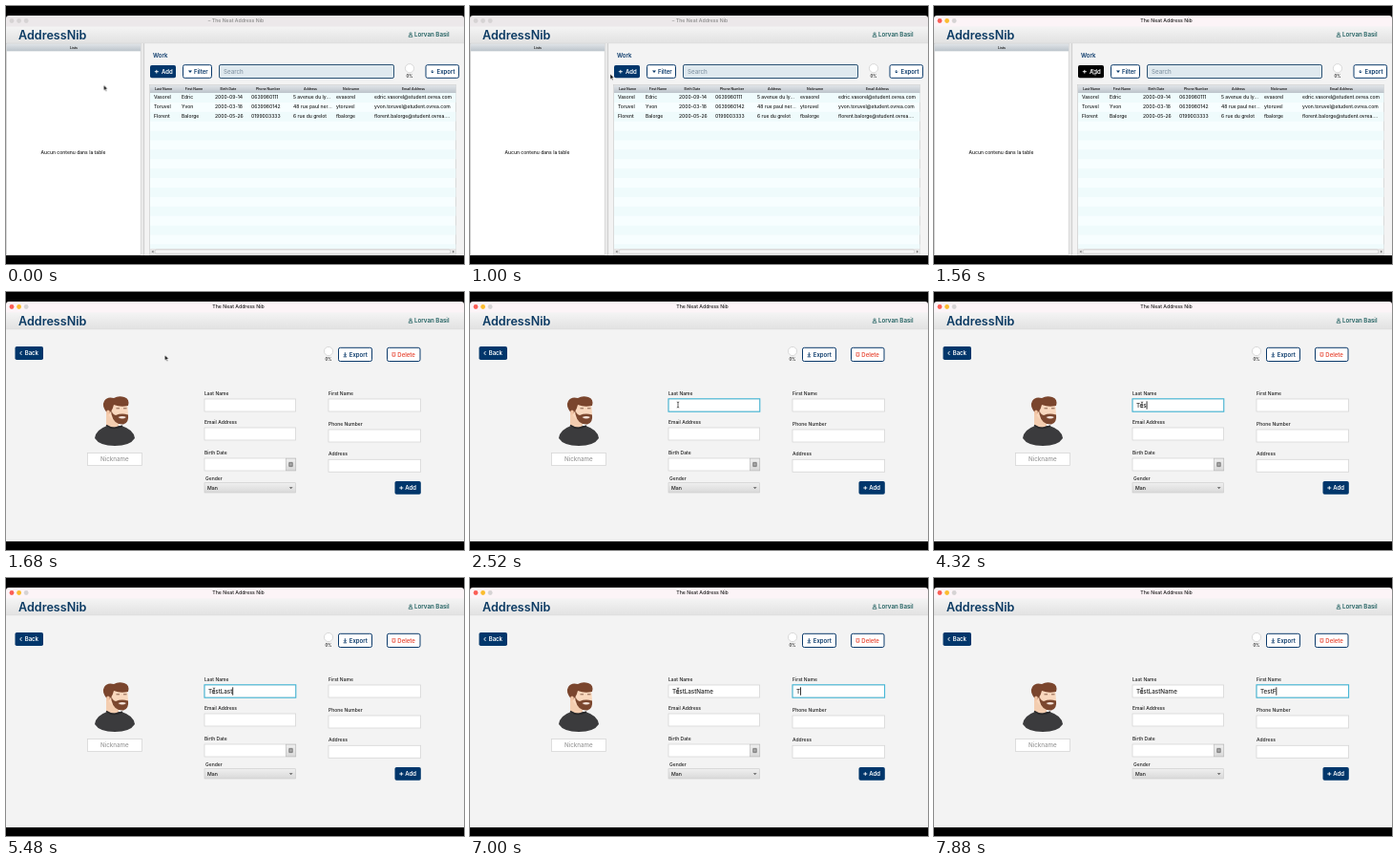
An HTML page that plays this animation: 480 px wide and 270 px high, repeating every 8000 ms.

```html
<!DOCTYPE html>
<html lang="en">
<head>
<meta charset="utf-8">
<title>Address book</title>
<style>
  html, body { margin: 0; width: 100%; height: 100%; overflow: hidden; background: #000; }
  svg { display: block; width: 480px; height: 270px; }
  text { font-family: Inter, "Open Sans", sans-serif; font-weight: 500; font-size: 5px; fill: #1c1c1c; white-space: pre; }

  .mid { text-anchor: middle; }
  .brand { font-size: 12.6px; font-weight: 600; fill: #0b3a63; }
  .user { font-size: 6.2px; font-weight: 600; fill: #1f5f5f; }
  .title { font-size: 5.2px; text-anchor: middle; }
  .head { font-size: 3.5px; font-weight: 600; text-anchor: middle; }
  .percent { font-size: 4.2px; text-anchor: middle; }
  .ring { fill: #fff; stroke: #ccc; stroke-width: .7; }
  .lights { fill: #d6d3d4; }
  .btn rect { fill: #fff; stroke: #0b3a6b; }
  .btn text { font-size: 6px; font-weight: 600; fill: #0b3a6b; }
  .btn path, .btn use { fill: none; stroke: #0b3a6b; stroke-width: .9; }
  .dark rect { fill: #00366b; stroke: none; }
  .dark text { fill: #fff; }
  .dark path, .dark use { stroke: #fff; }
  .red text { fill: #e8513f; }
  .red path { stroke: #e8513f; }
  .field { fill: #fff; stroke: #d6d6d6; stroke-width: .8; }
  .focus { fill: none; stroke: #38b4d6; }
  .typed { font-size: 6.25px; fill: #222; }
  .hint { font-size: 6.2px; fill: #9a9a9a; }

  /* Hard state changes */
  .idle, .active, .list, .form, .press rect, .arrow, .beam, .f-last, .f-first {
    animation: 8s step-end infinite;
  }
  .idle { animation-name: idle; }
  .active { animation-name: active; }
  .list { animation-name: list; }
  .form { animation-name: form; }
  .press rect { animation-name: press; }
  .arrow { animation-name: arrow; }
  .beam { animation-name: beam; }
  .f-last { animation-name: last; }
  .f-first { animation-name: first; }
  @keyframes idle { 18%, 100% { visibility: hidden; } }
  @keyframes active { 0% { visibility: hidden; } 18%, 100% { visibility: visible; } }
  @keyframes list { 20%, 100% { visibility: hidden; } }
  @keyframes form { 0% { visibility: hidden; } 20%, 100% { visibility: visible; } }
  @keyframes press { 18%, 100% { fill: #000; } }
  @keyframes arrow { 30.5%, 100% { visibility: hidden; } }
  @keyframes beam { 0% { visibility: hidden; } 30.5%, 100% { visibility: visible; } }
  @keyframes last { 0% { visibility: hidden; } 31% { visibility: visible; } 78%, 100% { visibility: hidden; } }
  @keyframes first { 0% { visibility: hidden; } 78%, 100% { visibility: visible; } }

  .mouse { animation: move 8s ease-in-out infinite; }
  @keyframes move {
    0%, 6.5% { transform: translate(102.5px, 82.7px); }
    16.25%, 23.5% { transform: translate(166.5px, 66px); }
    31%, 100% { transform: translate(218px, 118px); }
  }
</style>
</head>
<body>
<svg viewBox="0 0 480 270">
  <defs>
    <linearGradient id="top" x2="0" y2="1">
      <stop offset="0" stop-color="#f4f4f4"/><stop offset="1" stop-color="#e2e2e2"/>
    </linearGradient>
    <linearGradient id="th" x2="0" y2="1">
      <stop offset="0" stop-color="#e0e4e8"/><stop offset="1" stop-color="#bcc4cb"/>
    </linearGradient>
    <linearGradient id="combo" x2="0" y2="1">
      <stop offset="0" stop-color="#efefef"/><stop offset="1" stop-color="#d9d9d9"/>
    </linearGradient>
    <path id="down" d="M0-2V1M-1.3-.3L0 1L1.3-.3"/>
    <path id="save" d="M0-2.4V1M-1.3-.3L0 1L1.3-.3M-1.7 2.2H1.7"/>
    <path id="plus" d="M-2 0H2M0-1.8V1.8"/>
    <path id="bar" d="M0 21.5V13Q0 10 3 10H477Q480 10 480 13V21.5Z"/>
  </defs>

  <rect width="480" height="270"/>
  <rect y="21" width="480" height="240" fill="#f3f3f3"/>
  <rect y="21.5" width="480" height="17" fill="url(#top)"/>
  <path d="M0 38.7H480" stroke="#d2d2d2" stroke-width=".6"/>

  <g class="idle">
    <use href="#bar" fill="#ece8ea"/>
    <g class="lights"><circle cx="6" cy="15.5" r="2.4"/><circle cx="13.6" cy="15.5" r="2.4"/><circle cx="21.2" cy="15.5" r="2.4"/></g>
    <text class="title" x="241" y="17.3" style="fill:#888">– The Neat Address Nib</text>
  </g>
  <g class="active">
    <use href="#bar" fill="#fcf4f7"/>
    <g class="lights"><circle cx="6" cy="15.5" r="2.4" fill="#fb5e56"/><circle cx="13.6" cy="15.5" r="2.4" fill="#fbbc2e"/><circle cx="21.2" cy="15.5" r="2.4"/></g>
    <text class="title" x="243.5" y="17.3">The Neat Address Nib</text>
  </g>
  <text class="brand" x="13" y="35">AddressNib</text>
  <path d="M422 32.3Q422 30 424 30T426 32.3ZM422.9 28.9a1.1 1.1 0 1 1 2.2 0a1.1 1.1 0 1 1-2.2 0" fill="none" stroke="#1f5f5f" stroke-width=".7"/>
  <text class="user" x="428" y="32.4">Lorvan Basil</text>

  <g class="list">
    <rect x=".4" y="39.4" width="140.8" height="221.2" fill="#fff" stroke="#c8c8c8" stroke-width=".7"/>
    <rect x=".5" y="39.5" width="140.6" height="7.8" fill="url(#th)"/>
    <text class="head" x="71" y="44.6">Lists</text>
    <text class="mid" x="70.5" y="155.3">Aucun contenu dans la table</text>
    <rect x="142" y="39" width="3" height="222" fill="#e9e9e9"/>
    <path d="M144.6 39V261" stroke="#c2c2c2" stroke-width=".7"/>
    <text x="154" y="54" style="font-size:6px;font-weight:600;fill:#0b3a6b">Work</text>

    <g class="btn dark press">
      <rect x="151" y="62" width="27" height="13.3" rx="1.8"/>
      <use href="#plus" x="157.8" y="68.7"/><text x="163" y="70.8">Add</text>
    </g>
    <g class="btn">
      <rect x="185.5" y="61.7" width="30" height="13.6" rx="1.8"/>
      <path d="M191 67.6H195L193 70Z" style="fill:#0b3a6b;stroke:none"/><text x="197" y="70.8">Filter</text>
    </g>
    <rect x="223.5" y="61.5" width="183" height="14" rx="1.6" fill="#dfe9ef" stroke="#2b5274"/>
    <text x="228" y="70.8" style="font-size:6.2px;fill:#8496a5">Search</text>
    <circle class="ring" cx="423" cy="65.2" r="4.6"/>
    <text class="percent" x="423" y="75">0%</text>
    <g class="btn">
      <rect x="440" y="61.7" width="34.6" height="13.6" rx="1.8"/>
      <use href="#down" x="446.8" y="69"/><text x="451.5" y="70.8">Export</text>
    </g>

    <rect x="150.5" y="82.5" width="321" height="178" fill="#f7feff" stroke="#cecece" stroke-width=".7"/>
    <rect x="151" y="83" width="320.4" height="8" fill="url(#th)"/>
    <g id="table"></g>
    <rect x="151" y="254" width="320.4" height="6.2" fill="#e6e6e6"/>
    <rect x="156" y="255" width="310" height="4.2" rx="2" fill="#f4f4f4" stroke="#c0c0c0" stroke-width=".6"/>
    <path d="M154.5 255.7V258.5L152.5 257.1ZM468 255.7V258.5L470 257.1Z" fill="#777"/>
  </g>

  <g class="form">
    <g class="btn dark">
      <rect x="9.5" y="57" width="29.5" height="14" rx="1.8"/>
      <path d="M16.5 62L14.7 64L16.5 66"/><text x="19.7" y="66.2">Back</text>
    </g>
    <circle class="ring" cx="338" cy="62" r="4.6"/>
    <text class="percent" x="338" y="72">0%</text>
    <g class="btn">
      <rect x="348.5" y="58.3" width="35" height="14.2" rx="1.8"/>
      <use href="#save" x="355.3" y="65.6"/><text x="359.8" y="67.5">Export</text>
    </g>
    <g class="btn red">
      <rect x="399.5" y="58.3" width="34.5" height="14.2" rx="1.8"/>
      <path d="M404.4 63.8H408.4M405 64.5V67.2H407.8V64.5"/><text x="410.3" y="67.5">Delete</text>
    </g>

    <path d="M93 153Q94 144 106 140H121Q134 144 135 153Q130 161 114 161T93 153Z" fill="#3b3b3d"/>
    <path d="M105 127H118V140Q111 144 105 140Z" fill="#f3cdb0"/>
    <path d="M105 139.5Q113 145 122 140" fill="none" stroke="#28282a" stroke-width="1.6"/>
    <path d="M106 118Q107 113 116 113T127.5 121L128 129Q127 137 120 137T107 128Z" fill="#f9d8be"/>
    <path d="M110 122Q111 128 115 129Q121 126.5 128 128.5Q129 137 123 138.6Q113 139 110.5 128Z" fill="#7b472f"/>
    <path d="M117.5 131Q122 129 126 131Q122 134 117.5 131Z" fill="#f4e3da"/>
    <path d="M105.5 126Q100 119 103 114Q106 109 113 111Q118 108 124 110Q130 112 128 119Q120 121 113 118Q112 122 110.500 124L108.500 127Z" fill="#7a452d"/>
    <ellipse cx="107" cy="126" rx="1.9" ry="2.6" fill="#f2c5a5"/>
    <path d="M115.500 121.800H119M123 121.800H126.500" stroke="#6b4330" stroke-width=".8"/>

    <rect class="field" x="85.5" y="168.5" width="57" height="13"/>
    <text class="hint mid" x="113.8" y="177.2">Nickname</text>

    <g id="fields"></g>
    <rect x="293.3" y="174.2" width="10.4" height="12.6" fill="url(#combo)" stroke="#bdbdbd" stroke-width=".7"/>
    <path d="M296.8 178.4H300.2V182.6H296.8ZM296.8 179.8H300.2M296.8 181.2H300.2" fill="none" stroke="#444" stroke-width=".6"/>
    <text x="209" y="196.8">Gender</text>
    <rect x="208" y="199.7" width="95.6" height="10.3" fill="url(#combo)" stroke="#cacaca" stroke-width=".6"/>
    <text x="211" y="206.8" style="font-size:5.2px">Man</text>
    <path d="M296.8 204.2H300.6L298.7 206Z" fill="#555"/>
    <g class="btn dark">
      <rect x="407.5" y="198" width="27.3" height="13.8" rx="1.8"/>
      <use href="#plus" x="414.3" y="205"/><text x="418.3" y="207.1">Add</text>
    </g>
  </g>

  <rect class="focus f-last" x="208" y="111.8" width="95.8" height="13.4"/>
  <rect class="focus f-first" x="338" y="111.8" width="96.6" height="13.4"/>
  <text class="typed" id="last" x="212" y="120.8"></text>
  <text class="typed" id="first" x="342" y="120.8"></text>
  <rect id="caret" y="114.3" width=".8" height="8.4"/>

  <g class="mouse">
    <path class="arrow" d="M0 0V5.5L1.3 4.4L2.2 6.4L3.1 6L2.2 4H3.9Z" stroke="#fff" stroke-width=".5"/>
    <path class="beam" d="M-1.2-3Q0-3 0-2Q0-3 1.2-3M0-2V2M-1.2 3Q0 3 0 2Q0 3 1.2 3" fill="none" stroke="#222" stroke-width=".7"/>
  </g>
</svg>
<script>
  const LOOP = 8000, BLINK = 500;
  const $ = id => document.getElementById(id);

  function add(parent, tag, attrs, content = '') {
    const el = document.createElementNS('http://www.w3.org/2000/svg', tag);
    for (const key in attrs) el.setAttribute(key, attrs[key]);
    el.textContent = content;
    parent.append(el);
  }

  // Contact table: title, header centre, cell x, values
  const ROW = 9.9, TOP = 91, BOTTOM = 254;
  const columns = [
    ['Last Name', 165, 155, 'Vasorel', 'Toruvel', 'Florent'],
    ['First Name', 197, 184, 'Edric', 'Yvon', 'Balorge'],
    ['Birth Date', 233, 219, '2000-09-14', '2000-03-18', '2000-05-26'],
    ['Phone Number', 274.5, 257, '0639980111', '0639980142', '0199003333'],
    ['Address', 319, 301, '5 avenue du ly...', '48 rue paul ner...', '6 rue du grelot'],
    ['Nickname', 361.5, 346, 'evasorel', 'ytoruvel', 'fbalorge'],
    ['Email Address', 427, 386, 'edric.vasorel@student.ovrea.com', 'yvon.toruvel@student.ovrea.com', 'florent.balorge@student.ovrea....']
  ];
  for (let y = TOP; y < BOTTOM; y += 2 * ROW)
    add($('table'), 'rect', { x: 151, y, width: 320.4, height: Math.min(ROW, BOTTOM - y), fill: '#effbfc' });
  for (const [title, cx, x, ...cells] of columns) {
    add($('table'), 'text', { class: 'head', x: cx, y: 88.2 }, title);
    cells.forEach((cell, r) => add($('table'), 'text', { x, y: 97.3 + r * ROW }, cell));
  }

  [
    ['Last Name', 208, 112], ['Email Address', 208, 142], ['Birth Date', 208, 174],
    ['First Name', 338, 112], ['Phone Number', 338, 144], ['Address', 338, 175.3]
  ].forEach(([label, x, y]) => {
    add($('fields'), 'text', { x, y: y - 4.2 }, label);
    add($('fields'), 'rect', { class: 'field', x, y, width: x < 300 ? 95.6 : 96.6, height: 13 });
  });

  // Typing: `blink` is the caret phase before the first key
  const inputs = [
    { el: $('last'), x: 212, from: 2480, to: 6240, blink: 1980, value: 'TestLastName',
      keys: [3720, 3960, 4200, 4400, 4680, 4840, 5000, 5240, 5560, 5680, 5800, 5960] },
    { el: $('first'), x: 342, from: 6240, to: LOOP, blink: 6240, value: 'TestF',
      keys: [7000, 7200, 7400, 7560, 7880] }
  ];

  function draw() {
    const t = performance.now() % LOOP;
    let shown = false;
    for (const { el, x, from, to, blink, value, keys } of inputs) {
      const count = keys.filter(k => k <= t).length;
      el.textContent = value.slice(0, count);
      if (t < from || t >= to) continue;
      const since = t - (count ? keys[count - 1] : blink);
      shown = since % (2 * BLINK) < BLINK;
      $('caret').setAttribute('x', x + (count ? el.getComputedTextLength() : 0));
    }
    $('caret').setAttribute('visibility', shown ? 'visible' : 'hidden');
    requestAnimationFrame(draw);
  }
  draw();
</script>
</body>
</html>
```
